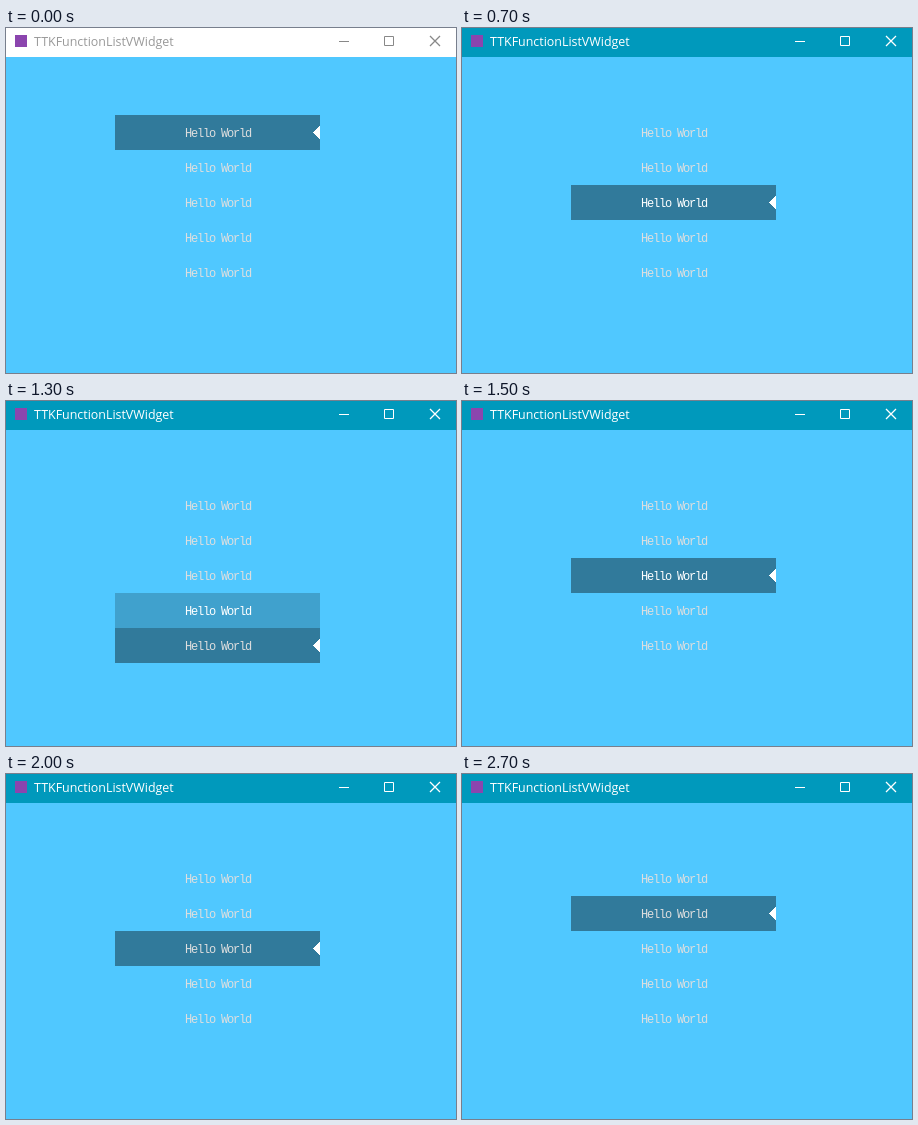
Animation, 450 px wide and 345 px high, one loop 3000 ms. Source, as an HTML page:

```html
<!DOCTYPE html>
<html lang="en">
<head>
<meta charset="utf-8">
<title>TTKFunctionListVWidget</title>
<style>
  html, body { margin: 0; width: 100%; height: 100%; overflow: hidden; }
  svg { display: block; width: 100%; height: 100%; }
  .title { font: 12.45px "Open Sans", "Noto Sans", sans-serif; }
  .item { font: 12px "Liberation Mono", monospace; letter-spacing: -1.2px; }
</style>
</head>
<body>
<svg viewBox="0 0 450 345" xmlns="http://www.w3.org/2000/svg">
  <rect width="450" height="345" fill="#50c8ff"/>
  <rect id="bar" width="450" height="29"/>
  <rect x="9" y="7" width="12" height="12" fill="#8b45ae"/>
  <text id="title" class="title" x="28" y="18">TTKFunctionListVWidget</text>
  <g id="buttons" fill="none">
    <path d="M333 13.5H343"/>
    <rect x="378.5" y="8.5" width="9" height="9" stroke-linejoin="round"/>
    <path d="M424 8L434 18M434 8L424 18" stroke-width="1.3"/>
  </g>
  <g id="list"></g>
  <path id="arrow" d="M314 10.5L307 17.5L314 24.5Z" fill="#fff" shape-rendering="crispEdges"/>
</svg>
<script>
const LOOP = 3000, FRAME = 100;
const ROWS = 5, TOP = 87, ROW_H = 35, BELOW = ROWS;

// The pointer sweeps between rows, one row per frame, and rests at the end.
const sweeps = [
  { at: 0, from: BELOW, to: BELOW },
  { at: 100, from: 1, to: 1 },
  { at: 400, from: 1, to: 2 },
  { at: 700, from: 2, to: 4 },
  { at: 1200, from: 4, to: 2 },
  { at: 1600, from: 2, to: 0 },
  { at: 2000, from: BELOW, to: 1 },
  { at: 2700, from: BELOW, to: BELOW }
];
const clicks = [400, 700, 1000, 1500, 2500];

const byId = id => document.getElementById(id);

function add(parent, tag, attrs) {
  const el = document.createElementNS("http://www.w3.org/2000/svg", tag);
  for (const key in attrs) el.setAttribute(key, attrs[key]);
  return parent.appendChild(el);
}

function pointerRow(t) {
  const { at, from, to } = sweeps.findLast(sweep => sweep.at <= t);
  const moved = Math.min(Math.floor((t - at) / FRAME), Math.abs(to - from));
  return from + Math.sign(to - from) * moved;
}

function selectedRow(t) {
  const click = clicks.findLast(time => time <= t);
  return click === undefined ? 0 : pointerRow(click);
}

const items = Array.from({ length: ROWS }, (_, i) => {
  const y = TOP + i * ROW_H;
  const box = add(byId("list"), "rect", { x: 109, y, width: 205, height: ROW_H });
  const label = add(byId("list"), "text", { class: "item", x: 179, y: y + 22 });
  label.textContent = "Hello World";
  return { box, label };
});

function render(ms) {
  const t = ms % LOOP;
  const hovered = pointerRow(t), selected = selectedRow(t);
  const active = t >= clicks[0];

  byId("bar").setAttribute("fill", active ? "#0099bc" : "#fff");
  byId("title").setAttribute("fill", active ? "#fff" : "#999");
  byId("buttons").setAttribute("stroke", active ? "#fff" : "#888");

  items.forEach(({ box, label }, i) => {
    const alpha = i === selected ? 100 : i === hovered ? 50 : 0;
    box.setAttribute("fill-opacity", alpha / 255);
    label.setAttribute("fill", i === hovered ? "#fff" : "#dedede");
  });
  byId("arrow").setAttribute("transform", `translate(0 ${TOP + selected * ROW_H})`);
}

const start = performance.now();
function tick() {
  render(performance.now() - start);
  requestAnimationFrame(tick);
}
tick();
</script>
</body>
</html>
```
